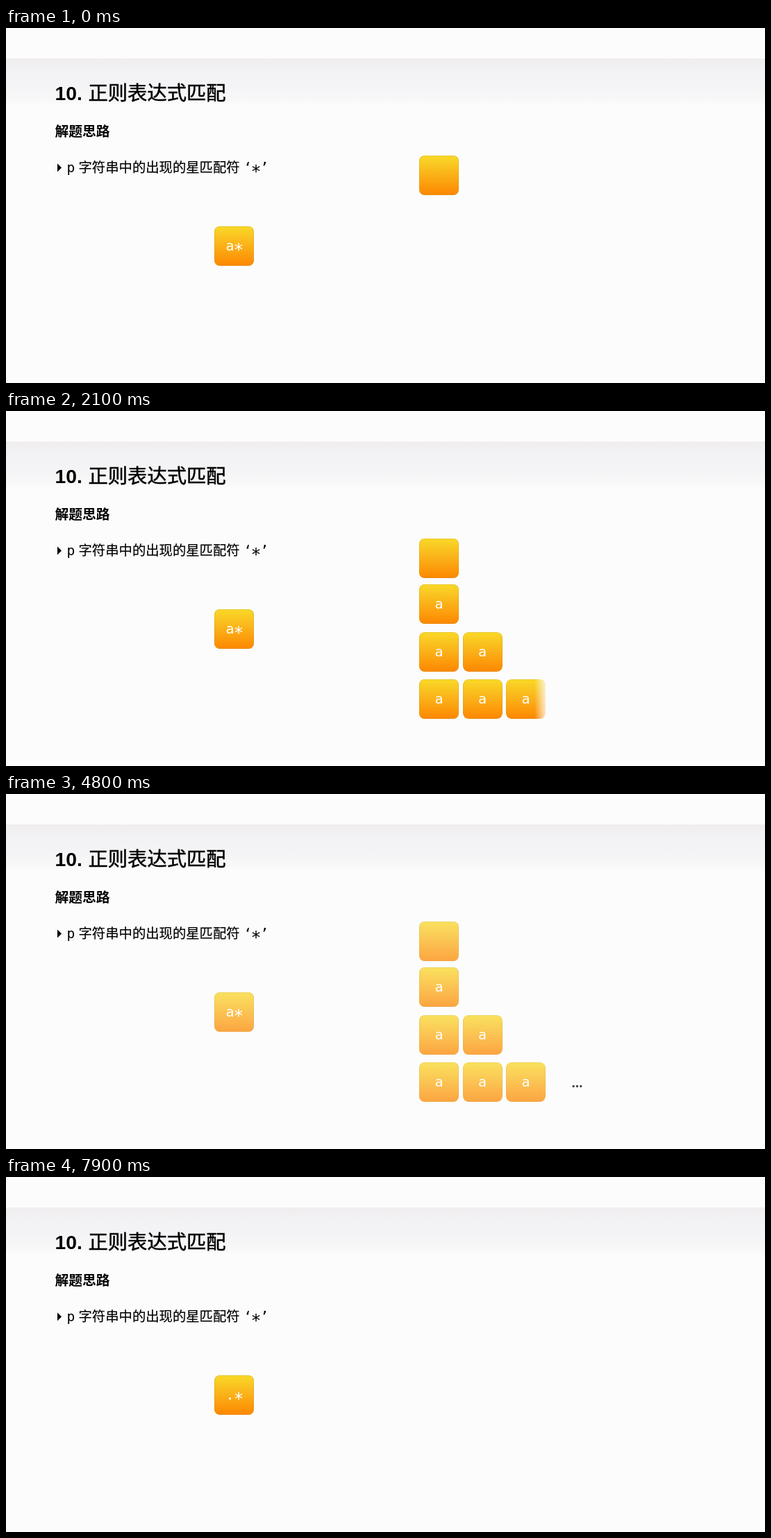
An HTML page for the animation above (8000 ms loop, 1093x512 px).

```html
<!DOCTYPE html>
<html lang="zh">
<head>
<meta charset="utf-8">
<title>正则表达式匹配</title>
<style>
  html, body { margin: 0; width: 100%; height: 100%; overflow: hidden; background: #fcfcfc; }
  .stage { position: relative; width: 1093px; height: 512px; overflow: hidden; }
  .band {
    position: absolute; top: 44px; width: 100%; height: 68px;
    background: linear-gradient(#f0edef, #f2f1f3 22%, #f4f4f6 60%, #f8f8f9 88%, #fcfcfc);
  }
  svg, .tiles { position: absolute; left: 0; top: 0; }
  svg { width: 1093px; height: 512px; }
  .cjk { font-family: "Noto Sans CJK SC", "Noto Sans CJK", sans-serif; }
  .mono { font-family: "DejaVu Sans Mono", monospace; font-size: 19.5px; }
  .mono .star { font-size: 25px; }

  .tile {
    position: absolute; left: var(--x); top: var(--y); width: 57px; height: 57px;
    border-radius: 8px;
    background: linear-gradient(#f9d928, #fbb018 50%, #fd8700);
    box-shadow: inset 0 0 0 .6px rgba(190, 150, 40, .5);
    color: #fff; font: 20px/57px "DejaVu Sans Mono", monospace; text-align: center;
  }
  .pair { text-indent: -12px; }
  .pair i {
    position: absolute; left: 27.5px; top: 5px; width: 15px;
    font-style: normal; font-size: 25px; text-indent: 0;
  }
  .dots {
    position: absolute; left: 802px; top: 404px; width: 41px;
    font: bold 16px/27px "DejaVu Sans", sans-serif; text-align: center;
  }

  .tiles, .enter, .wipe, .dots, .next { animation: 8s linear infinite; }
  .tiles { animation-name: leave; }
  .enter { animation-name: enter; }
  .dots { animation-name: dots; }
  .next { animation-name: next; }
  .wipe {
    -webkit-mask: linear-gradient(90deg, #000 57px, transparent 77px) 0 0 / 134px 100% no-repeat;
  }
  .second { animation-name: second; }
  .third { animation-name: third; }

  @keyframes leave {
    0%, 59.6% { opacity: 1; }
    61.2%, 100% { opacity: 0; }
  }
  @keyframes enter {
    0%, .75% { opacity: 0; transform: translate(var(--dx), var(--dy)); }
    11.75%, 100% { opacity: 1; transform: none; }
  }
  @keyframes second {
    0% { -webkit-mask-position: -77px 0; }
    10.6% { -webkit-mask-position: -77px 0; animation-timing-function: cubic-bezier(.33, 1, .68, 1); }
    21.9%, 100% { -webkit-mask-position: 0 0; }
  }
  @keyframes third {
    0% { -webkit-mask-position: -77px 0; }
    21.6% { -webkit-mask-position: -77px 0; animation-timing-function: cubic-bezier(.33, 1, .68, 1); }
    32.9%, 100% { -webkit-mask-position: 0 0; }
  }
  @keyframes dots {
    0%, 28.75% { opacity: 0; }
    31.25%, 100% { opacity: 1; }
  }
  @keyframes next {
    0%, 64.4% { opacity: 0; }
    69.4%, 100% { opacity: 1; }
  }
</style>
</head>
<body>
<div class="stage">
  <div class="band"></div>
  <svg viewBox="0 0 1093 512">
    <text x="70.5" y="103.5" font-family="Liberation Sans, sans-serif" font-weight="bold" font-size="28.3">10.</text>
    <text class="cjk" x="118.5" y="103.5" font-size="28.3" stroke="#000" stroke-width=".5">正则表达式匹配</text>
    <text class="cjk" x="70.5" y="155.5" font-size="19.8" font-weight="bold">解题思路</text>
    <path d="M74 195.5L80 201.5L74 207.5Z"/>
    <text class="mono" x="87.5" y="207.5">p</text>
    <text class="cjk" x="104.5" y="207.5" font-size="19.35" stroke="#000" stroke-width=".2">字符串中的出现的星匹配符</text>
    <g class="mono" text-anchor="middle">
      <text x="348" y="207.5">‘</text>
      <text class="star" x="360" y="214.8">*</text>
      <text x="372" y="207.5">’</text>
    </g>
  </svg>

  <div class="tiles">
    <div class="tile pair" style="--x:300px;--y:285.5px">a<i>*</i></div>
    <div class="tile" style="--x:595px;--y:184px"></div>
    <div class="tile enter" style="--x:595px;--y:249.5px;--dx:-84px;--dy:0px">a</div>
    <div class="tile enter" style="--x:595px;--y:318.5px;--dx:-84px;--dy:0px">a</div>
    <div class="tile enter" style="--x:595px;--y:387px;--dx:-47px;--dy:-41px">a</div>
    <div class="tile wipe second" style="--x:657.5px;--y:318.5px">a</div>
    <div class="tile wipe second" style="--x:657.5px;--y:387px">a</div>
    <div class="tile wipe third" style="--x:720px;--y:387px">a</div>
    <div class="dots">…</div>
  </div>
  <div class="tile pair next" style="--x:300px;--y:285.5px">.<i>*</i></div>
</div>
</body>
</html>
```
